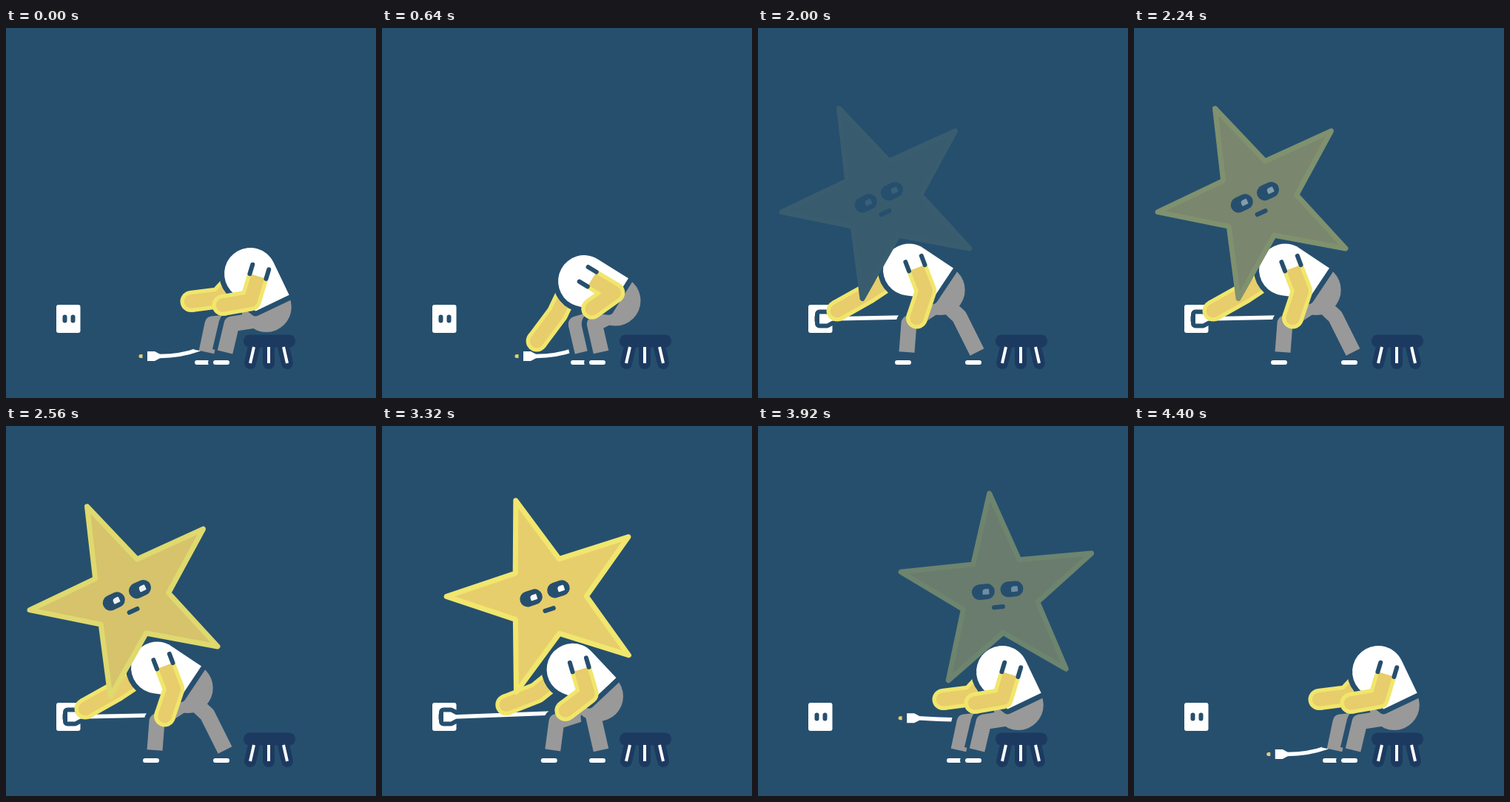
Recreate the animation shown at these times as an HTML page with a canvas. Size 500 by 500 pixels, loop 4.56 s.

```html
<!DOCTYPE html>
<html lang="en">
<head>
<meta charset="utf-8">
<title>Star lamp</title>
<style>
html, body { margin: 0; width: 100%; height: 100%; overflow: hidden; background: #264f6e; }
canvas { display: block; width: 500px; height: 500px; }
</style>
</head>
<body>
<canvas id="stage"></canvas>
<script>
const LOOP = 4560, STEP = 40;
const BG = '#264f6e', WHITE = '#ffffff', GREY = '#999999', STOOL = '#1c3a60';
const SKIN = '#e7cd6b', RIM = '#f1e66c';

// Moments: lean down, lift the plug, go back, cord pulls out
const LEAN = 280, LIFT = 800, BACK = 2960, PULL = 3840;

const canvas = document.getElementById('stage');
const dpr = window.devicePixelRatio || 1;
canvas.width = canvas.height = 500 * dpr;
const c = canvas.getContext('2d');
c.scale(dpr, dpr);

const mix = (a, b, k) => a.map((v, i) => v + (b[i] - v) * k);
const clamp = p => Math.max(0, Math.min(1, p));
const ramp = (t, from, to) => {
  const p = clamp((t - from) / (to - from));
  return p * p * (3 - 2 * p);
};
const polar = ([x, y], deg, len) => {
  const a = deg * Math.PI / 180;
  return [x + len * Math.cos(a), y + len * Math.sin(a)];
};

// Things taken to the outlet rise first and slide in last
function carry(t, [x0, y0], [x1, y1]) {
  const k = ramp(t, LIFT, 1600);
  return [x0 + (x1 - x0) * k, y0 + (y1 - y0) * (1 - (1 - k) ** 1.7)];
}

const glide = end => (t, a, b) => mix(a, b, ramp(t, LIFT, end));

// A body part moves sitting -> grabbing -> plugged in -> sitting
const part = (sit, grab, plugged, go = glide(1490), home = 3760) => t =>
  t < LIFT ? mix(sit, grab, ramp(t, LEAN, 760)) :
  t < BACK ? go(t, grab, plugged) :
  mix(plugged, sit, ramp(t, BACK, home));

const torso = part([330, 332, 28.7], [262.5, 344, -9.6], [204, 326.5, -2]);
const nearHand = part([293, 374.5], [282, 380], [214.5, 392]);
const farHand = part([250, 369.5], [201.5, 433], [107, 382], carry);
const nearKnee = part([305, 400], [284, 400], [272, 390], glide(1400));
const farKnee = part([279, 400], [259, 400], [204, 399], glide(1400));
const farFoot = part([258], [258], [188], glide(1400));
const star = part([326, 226.5, -5.6], [203, 253, -29.8], [167, 232, -25], glide(1490), 3858);

const FLOOR = [191, 443.5], SOCKET = [83, 393];

function plug(t) {
  if (t < PULL) return carry(t, FLOOR, SOCKET);
  const p = clamp((t - PULL) / 560);
  const swing = Math.exp(-6 * p) * Math.cos(4 * Math.PI * p);
  const fall = clamp(p / .75) ** 2;
  return [FLOOR[0] + (SOCKET[0] - FLOOR[0]) * swing, SOCKET[1] + (FLOOR[1] - SOCKET[1]) * fall];
}

function cordEnd(t) {
  const slack = [262, 434], held = [195, 391], taut = [275, 384];
  if (t < BACK) return carry(t, slack, held);
  return t < PULL ? mix(held, taut, ramp(t, BACK, 3760)) : mix(taut, slack, ramp(t, PULL, 4080));
}

function line(pts, width, color, cap = 'round') {
  c.beginPath();
  for (let i = 0; i < pts.length; i += 2) c.lineTo(pts[i], pts[i + 1]);
  c.lineWidth = width;
  c.strokeStyle = color;
  c.lineCap = cap;
  c.lineJoin = 'round';
  c.stroke();
}

function disc([x, y], r, color) {
  c.beginPath();
  c.arc(x, y, r, 0, Math.PI * 2);
  c.fillStyle = color;
  c.fill();
}

function box(x, y, w, h, r, color) {
  c.beginPath();
  c.roundRect(x, y, w, h, r);
  c.fillStyle = color;
  c.fill();
}

// Fill the current path inside a gap of wall colour
function cutOut(gap) {
  c.lineWidth = gap * 2;
  c.lineJoin = 'round';
  c.strokeStyle = BG;
  c.stroke();
  c.fillStyle = WHITE;
  c.fill();
}

function drawRoom() {
  c.fillStyle = BG;
  c.fillRect(0, 0, 500, 500);
  box(68, 374, 32.5, 38, 3, WHITE);
  for (const x of [76.5, 87.5]) box(x, 387.5, 6, 11, 3, BG);
  box(321, 414.5, 70, 17, 8, STOOL);
  const legs = [-1, 0, 1].map(s => [355 + s * 20, 431, 355 + s * 25, 453]);
  for (const leg of legs) line(leg, 16, STOOL);
  for (const leg of legs) line(leg, 4, WHITE, 'butt');
}

function drawCord([x, y], [ex, ey], sag) {
  c.beginPath();
  for (const s of [-1, 1]) {
    const side = [[0, 6.5], [10, 6.5], [17, 2.8]];
    if (s > 0) side.reverse();
    for (const [dx, dy] of side) c.lineTo(x + dx, y + s * dy);
  }
  c.closePath();
  cutOut(6);
  if (x > 95) box(x - 11.5, y - 2.5, 5, 5, [2.5, 0, 0, 2.5], SKIN);

  c.beginPath();
  c.moveTo(x + 15, y);
  c.quadraticCurveTo((x + 17 + ex) / 2, (y + ey) / 2 + sag, ex, ey);
  c.lineWidth = 5.5;
  c.strokeStyle = WHITE;
  c.lineCap = 'butt';
  c.stroke();
}

function drawShoe(x) {
  line([x, 452, x + 16, 452], 20, BG);
  line([x, 452, x + 16, 452], 6, WHITE);
}

function drawLeg(hip, knee, footX) {
  const pts = [...hip, ...knee, footX + 13, 438];
  line(pts, 35, BG, 'butt');
  line(pts, 21, GREY, 'butt');
}

// The elbow bulges sideways by an amount that depends on the reach
function drawArm(shoulder, hand, bend) {
  const dx = hand[0] - shoulder[0], dy = hand[1] - shoulder[1], d = Math.hypot(dx, dy);
  const mid = mix(shoulder, hand, .46), b = bend(d) / d;
  const elbow = [mid[0] + dy * b, mid[1] - dx * b];
  for (const [w, color] of [[29, RIM], [18.5, SKIN]]) {
    line([...shoulder, ...elbow, ...hand], w, color, 'butt');
    disc(hand, w / 2, color);
  }
  return elbow;
}

// Marks beside the start of the upper arm
function drawSleeve([x, y], [ex, ey]) {
  const d = Math.hypot(ex - x, ey - y), ux = (ex - x) / d, uy = (ey - y) / d;
  for (const side of [-11.5, 11.5]) {
    const mx = x - uy * side, my = y + ux * side;
    line([mx, my, mx - ux * 13, my - uy * 13], 6, BG);
  }
}

// A round chest with tangents running to both ends of the waist
function drawTorso([x, y], back, front) {
  const r = 35;
  const tangent = ([px, py], side) =>
    Math.atan2(py - y, px - x) + side * Math.acos(r / Math.hypot(px - x, py - y));
  c.beginPath();
  c.arc(x, y, r, tangent(front, 1), tangent(back, -1));
  c.lineTo(...back);
  c.lineTo(...front);
  c.closePath();
  cutOut(7);
}

function drawBody(t) {
  const [x, y, tilt] = torso(t), chest = [x, y];
  const pelvis = polar(chest, tilt + 35.5, 50);
  const hip = [pelvis[0] + 4, pelvis[1] + 15];
  const shoulder = polar(chest, tilt - 10, 11);
  const [foot] = farFoot(t);

  drawShoe(foot);
  drawShoe(283);
  drawLeg(hip, farKnee(t), foot);
  drawLeg(hip, nearKnee(t), 283);
  disc(pelvis, 34, GREY);
  drawArm([x - 19, y + 8], farHand(t), d => .45 * (95 - d));
  drawTorso(chest, polar(chest, tilt, 60), polar(chest, tilt + 53, 51));
  const elbow = drawArm(shoulder, nearHand(t), d => Math.sqrt(Math.max(0, 72 * 72 - d * d)) / 2);
  drawSleeve(shoulder, elbow);
}

// Unlit, the star is a silhouette in the wall colour
function drawStar([x, y, deg], glow) {
  const lit = rgb => `rgb(${mix([38, 79, 110], rgb, glow).map(Math.round)})`;
  c.save();
  c.translate(x, y);
  c.rotate(deg * Math.PI / 180);
  c.beginPath();
  for (let i = 0; i < 10; i++) c.lineTo(...polar([0, 0], i * 36 - 90, i % 2 ? 53 : 136));
  c.closePath();
  c.fillStyle = lit([231, 206, 108]);
  c.fill();
  c.lineWidth = 7;
  c.lineJoin = 'round';
  c.strokeStyle = lit([241, 230, 110]);
  c.stroke();
  for (const ex of [-21.3, 17.5]) {
    line([ex - 5, -4.5, ex + 5, -4.5], 21, BG);
    box(ex - 1, -8, 9, 7.5, [4, 1, 1, 1], lit([255, 255, 255]));
  }
  line([-8.8, 18, 3.2, 18], 6, BG);
  c.restore();
}

function draw() {
  const t = Math.floor(performance.now() % LOOP / STEP) * STEP;
  const sag = 5 * (1 - ramp(t, LIFT, 1600) + ramp(t, PULL, 4200));
  drawRoom();
  drawCord(plug(t), cordEnd(t), sag);
  drawBody(t);
  drawStar(star(t), ramp(t, 1835, 2720) * (1 - ramp(t, 3860, 3960)));
  requestAnimationFrame(draw);
}
draw();
</script>
</body>
</html>
```
